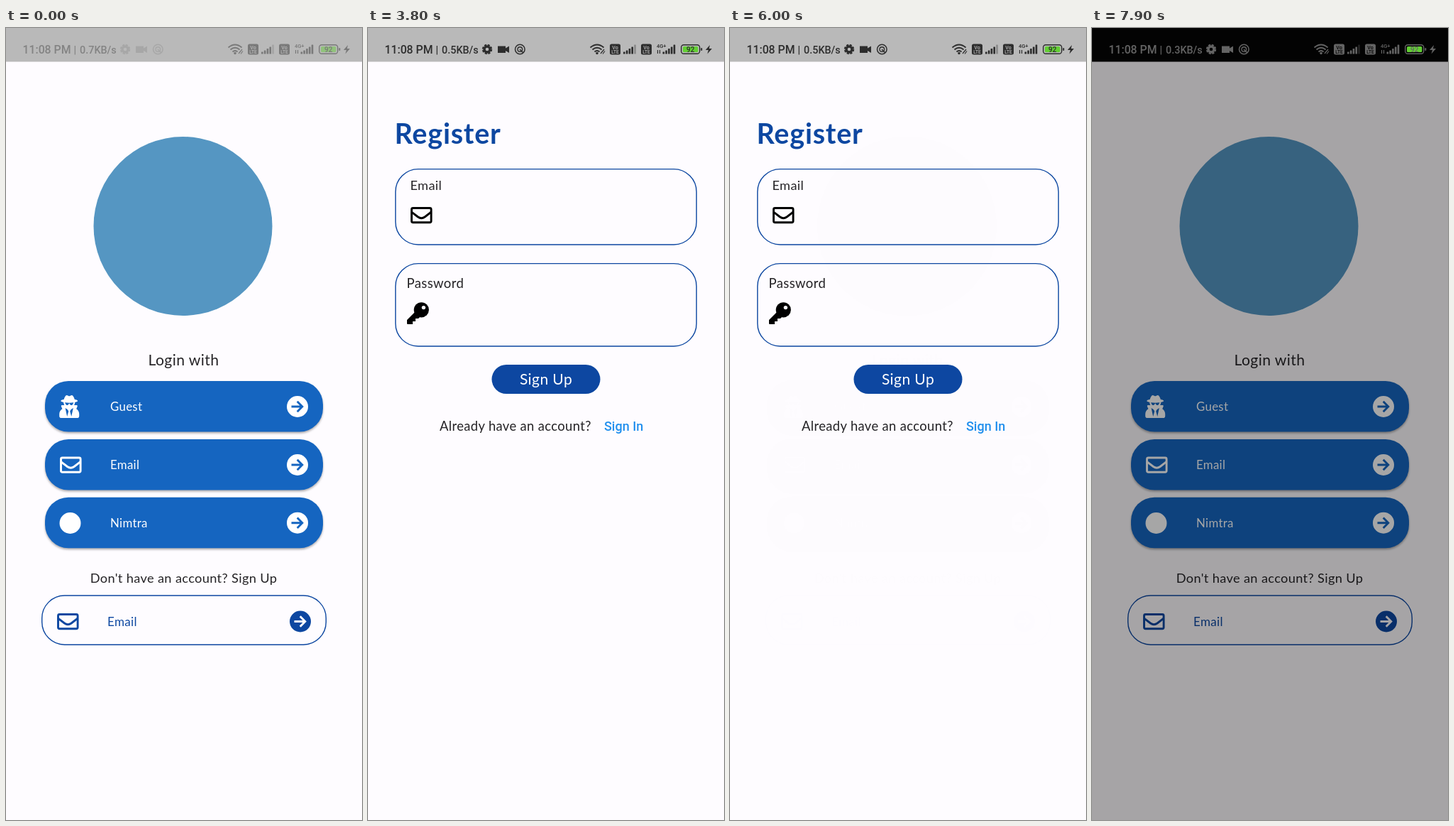
Recreate the animation shown at these times as an HTML page. Size 502x1115 px, loop 8000 ms.

```html
<!DOCTYPE html>
<html lang="en">
<head>
<meta charset="utf-8">
<style>
  html, body { margin: 0; width: 100%; height: 100%; overflow: hidden; background: #fefcff; }
  svg { display: block; width: 502px; height: 1115px; }
  text { font-family: Lato, sans-serif; letter-spacing: .02em; fill: #252326; }
  .mid { text-anchor: middle; }
  .white { fill: #fff; }
  .navy { fill: #0d47a1; }
  .title { font-weight: 700; }
  .link { font: 500 18px Roboto, sans-serif; letter-spacing: 0; fill: #2290ee; }
  #status text { font-family: Roboto, sans-serif; font-weight: 500; letter-spacing: 0; fill: currentColor; }
  .frame { fill: none; stroke: #0d47a1; stroke-width: 1.4; }
  .card { fill: #1565c0; filter: drop-shadow(0 2px 1.5px rgba(0, 0, 0, .32)); }
</style>
</head>
<body>
<svg id="stage" viewBox="0 0 502 1115"></svg>
<script>
const DURATION = 8000, TRANSITION = 300;

const text = (x, y, size, str, cls = '') =>
  `<text x="${x}" y="${y}" font-size="${size}" class="${cls}">${str}</text>`;

const box = (x, y, w, h, r, attrs) =>
  `<rect x="${x}" y="${y}" width="${w}" height="${h}" rx="${r}" ${attrs}/>`;

const envelope = (x, y, color) =>
  `<g transform="translate(${x} ${y})" fill="none" stroke="${color}" stroke-width="2.9">
    <rect x="1.5" y="1.5" width="27.6" height="20.2" rx="2"/>
    <path d="M1.5 7.1L10.5 14Q15.3 17.5 20.1 14L29 7.1"/></g>`;

const arrow = (x, y, disc, line) =>
  `<g transform="translate(${x} ${y})"><circle r="15" fill="${disc}"/>
    <path d="M-8.5 0H6M-.3-7.2L6.8 0L-.3 7.2" fill="none" stroke="${line}" stroke-width="2.9"/></g>`;

const spy = `<path transform="translate(75.2 517) scale(.0625)" fill="#fff" fill-rule="evenodd" d="
  M32 128C32 112 60 102 102 95C111 62 129 29 143 12Q159-6 182 3L210 17Q224 24 238 17L266 3Q289-6 305 12
  C319 29 337 62 346 95C388 102 416 112 416 128C416 141 391 152 352 160Q352 190 334 224H393Q413 226 408 246
  L384 308C422 332 448 374 448 422V467Q448 512 403 512H45Q0 512 0 467V422C0 373 27 330 67 308L42 246
  Q38 226 56 224H114Q96 195 96 160C57 152 32 141 32 128Z
  M176 480L134 288L184 320L208 360ZM272 480L240 360L264 320L314 288Z
  M128 165Q224 176 320 165V176Q310 182 297 215C280 230 245 225 233 190Q224 180 215 190C203 225 168 230 151 215
  Q138 182 128 176Z"/>`;

const key = `<path d="M66 400L55 411V416Q55 417 56 417H63V413H67V409H71L76 404Z"/>
  <circle cx="75.3" cy="396.8" r="10.6"/><circle cx="78.4" cy="393.6" r="2.7" fill="#fefcff"/>`;

const card = (y, label, icon) =>
  box(55, y, 392, 71.5, 33, 'class="card"') + icon +
  text(147, y + 42.3, 16.8, label, 'white') + arrow(411, y + 36, '#fff', '#1565c0');

const page = (id, content) =>
  `<g id="${id}">${box(0, 0, 502, 1115, 0, 'fill="#fefcff"')}${content}</g>`;

const home = page('home',
  '<circle cx="249.5" cy="279" r="126" fill="#5596c2"/>' +
  text(250.5, 474.5, 21.1, 'Login with', 'mid') +
  card(497, 'Guest', spy) +
  card(579, 'Email', envelope(76, 603.5, '#fff')) +
  card(660.7, 'Nimtra', '<circle cx="90.5" cy="697" r="15" fill="#fff"/>') +
  text(250.5, 780.5, 18.2, "Don't have an account? Sign Up", 'mid') +
  box(50.7, 799, 400.6, 69.2, 32, 'class="frame"') +
  envelope(72, 824, '#0d47a1') + text(143, 842, 17, 'Email', 'navy') +
  arrow(415, 835.5, '#0d47a1', '#fefcff'));

const form = (id, title, action, width, questionX, question, linkX, link) => page(id,
  text(37.5, 163, 39.5, title, 'title navy') +
  box(38.8, 198.6, 424.4, 106.4, 32, 'class="frame"') +
  text(59.5, 227.5, 18.2, 'Email') + envelope(60, 252, '#000') +
  box(38.8, 331.6, 424.4, 116.4, 32, 'class="frame"') +
  text(54.5, 365.5, 18.5, 'Password') + key +
  box(251 - width / 2, 474, width, 41, 20.5, 'class="navy"') +
  text(251, 502, 21, action, 'mid white') +
  text(questionX, 567.3, 18.4, question) + text(linkX, 567.3, 18, link, 'link'));

const bars = (x, dim) => [3, 5, 7.5, 10, 13].map((h, i) =>
  box(x + i * 3.8, 36.5 - h, 2.6, h, .6, `fill="currentColor" opacity="${dim && i === 4 ? .35 : 1}"`)).join('');

const volte = x => box(x, 22.5, 15, 15, 2.5, 'fill="currentColor"') +
  `<g class="cut" text-anchor="middle">${text(x + 7.5, 29.5, 7, 'Vo')}${text(x + 7.5, 36, 6.5, 'LTE')}</g>`;

const status = `<g id="status">
  <rect id="bar" width="502" height="47.5"/>
  <g id="clock">${text(23.5, 35.5, 15.8, '11:08 PM')}${text(95.5, 35.5, 14.4, '|')}
    <text id="speed" x="104" y="35.5" font-size="14.4"></text></g>
  <g id="tools" fill="none" stroke="currentColor">
    <circle cx="168" cy="30" r="4" stroke-width="3.4"/>
    <circle cx="168" cy="30" r="6.2" stroke-width="2" stroke-dasharray="3.2 1.67"/>
    <path d="M183 25.5H194V28.5L199 25.5V35L194 32V35H183Z" fill="currentColor" stroke="none"/>
    <circle cx="214.3" cy="30" r="6.8" stroke-width="1.5"/>
    <circle cx="214.3" cy="30" r="3.3" stroke-width="1.4"/><path d="M214 30L219 35" stroke-width="1.5"/></g>
  <g id="signals">
    <g fill="none" stroke="currentColor" stroke-width="1.9">
      <path d="M313.5 27.5Q323 19.5 332.5 27.5M316.5 30.5Q323 25 329.5 30.5M319.5 33.5Q323 30.5 326.5 33.5"/>
      <path d="M328 36L333 30M331 36.5L334 32.5" stroke-width="1.2"/></g>
    <circle cx="323" cy="35.5" r="1.7" fill="currentColor"/>
    ${volte(341)}${bars(360, true)}${volte(385)}
    ${text(407, 27.5, 7.5, '4G+')}
    <path d="M408.5 36V31M411.5 31V36" stroke="currentColor" stroke-width="1.2"/>${bars(415.5)}
    ${box(441.7, 23.7, 26, 12.6, 3.5, 'fill="none" stroke="currentColor" stroke-width="1.4"')}
    ${box(444, 26, 21.4, 8, 1.5, 'fill="#62cf33"')}
    ${box(469.3, 28, 2, 4, 1, 'fill="currentColor"')}
    ${text(454.8, 33.7, 10, '92', 'mid')}
    <path d="M482 24L476 31H480L478.5 36.5L485 29H481Z" fill="currentColor"/></g></g>`;

const $ = id => document.getElementById(id);
$('stage').innerHTML = home +
  form('login', 'Login', 'Login', 128, 110.5, "Don't have an account?", 322, 'SignUp') +
  form('register', 'Register', 'Sign Up', 153, 101, 'Already have an account?', 333, 'Sign In') +
  box(0, 0, 502, 1115, 0, 'id="shade"') + status;

const clamp = v => Math.min(1, Math.max(0, v));
const mix = (a, b, k) => a + (b - a) * k;
const gray = v => `rgb(${v},${v},${v})`;

function bezier(x1, y1, x2, y2) {
  const at = (a, b, s) => 3 * a * s * (1 - s) ** 2 + 3 * b * s * s * (1 - s) + s ** 3;
  return x => {
    let lo = 0, hi = 1;
    for (let i = 0; i < 24; i++) {
      const m = (lo + hi) / 2;
      if (at(x1, x2, m) < x) lo = m; else hi = m;
    }
    return at(y1, y2, lo);
  };
}
const slide = bezier(.4, 0, .2, 1), fade = bezier(.42, 0, 1, 1);

// Each page lists its [push, pop] times; popping plays the push backwards.
const visits = {
  login: [[2000, 4498]],
  register: [[3000, 3900], [5234, 6000]],
};

function render(t) {
  for (const id in visits) {
    const p = visits[id].reduce((sum, [push, pop]) =>
      sum + clamp((t - push) / TRANSITION) - clamp((t - pop) / TRANSITION), 0);
    const el = $(id);
    el.style.display = p > 0 ? '' : 'none';
    el.setAttribute('opacity', fade(p));
    el.setAttribute('transform', `translate(0 ${(1 - slide(p)) * 1115 / 4})`);
  }
  const wake = clamp(t / 400), dim = clamp((t - 7550) / 350);
  $('clock').setAttribute('opacity', mix(.38, 1, wake));
  $('tools').setAttribute('opacity', mix(.12, 1, wake));
  $('signals').setAttribute('opacity', mix(.45, 1, wake));
  $('speed').textContent = (t < 1400 ? '0.7' : t < 6500 ? '0.5' : '0.3') + 'KB/s';
  $('shade').setAttribute('opacity', .35 * dim);
  const barColor = gray(mix(185, 3, dim));
  $('bar').style.fill = barColor;
  $('status').style.color = gray(mix(45, 100, dim));
  document.querySelectorAll('.cut text').forEach(el => el.style.fill = barColor);
}

function tick() {
  render(performance.now() % DURATION);
  requestAnimationFrame(tick);
}
tick();
</script>
</body>
</html>
```
